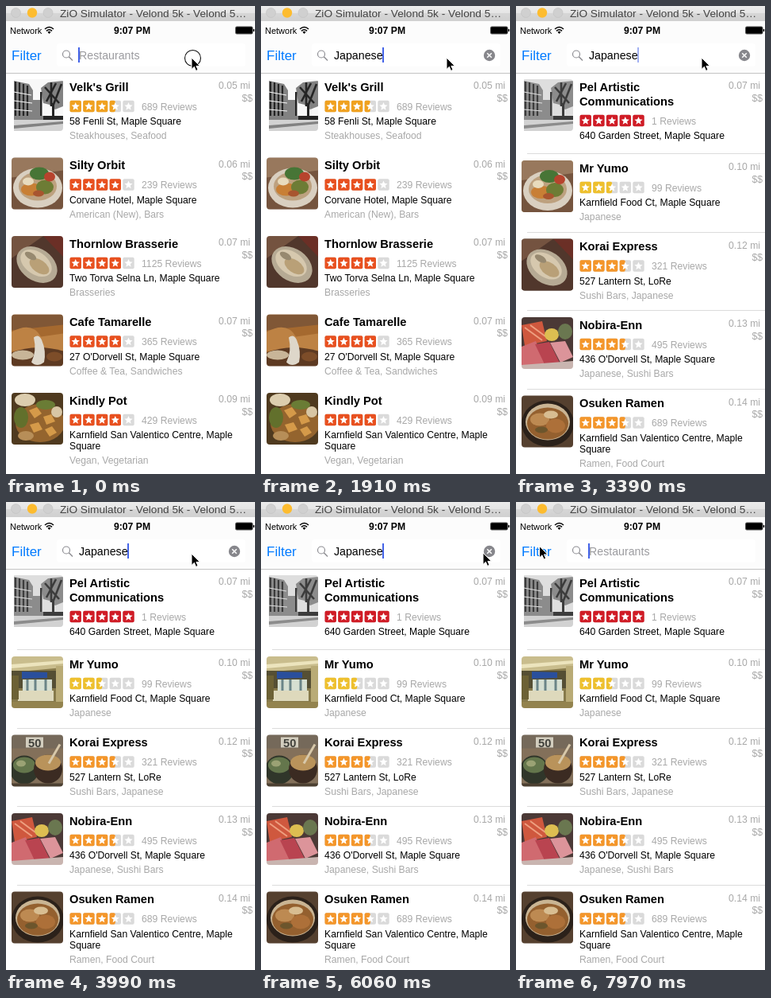
These frames come from a looping animation (314 px wide and 588 px high, 8000 ms). An HTML page:

```html
<!DOCTYPE html>
<html lang="en">
<head>
<meta charset="utf-8">
<title>Restaurant search</title>
<style>
html, body { margin: 0; width: 100%; height: 100%; overflow: hidden; background: #fff; }
svg { display: block; width: 314px; height: 588px; font-family: "Liberation Sans", Arial, sans-serif; }
text { white-space: pre; }
.name { font-size: 14.7px; font-weight: bold; }
.line { font-size: 12.2px; }
.pale { fill: #a8a8a8; }
.field { font-size: 14.2px; }
.end { text-anchor: end; }
</style>
</head>
<body>
<svg id="stage" viewBox="0 0 314 588"></svg>
<script>
const LOOP = 8000, STEP = 147.5, ROW = 98.5;

const rect = (x, y, w, h, fill, extra = '') => `<rect x="${x}" y="${y}" width="${w}" height="${h}" fill="${fill}" ${extra}/>`;
const oval = (x, y, rx, ry, fill, extra = '') => `<ellipse cx="${x}" cy="${y}" rx="${rx}" ry="${ry}" fill="${fill}" ${extra}/>`;
const path = (d, fill, extra = '') => `<path d="${d}" fill="${fill}" ${extra}/>`;
const line = (d, colour, width) => path(d, 'none', `stroke="${colour}" stroke-width="${width}"`);
const text = (x, y, cls, str, extra = '') => `<text x="${x}" y="${y}" class="${cls}" ${extra}>${str}</text>`;
const ground = fill => rect(-4, -4, 73, 73, fill);

// Thumbnails, each in a 65 x 65 box
const street = (sky, dark, mid) => ground(sky) +
  path('M3 2L22 6 27 14V50H3Z', mid) + line('M5 3V48M10 4V48M15 6V48M20 8V48', dark, 2.2) +
  line('M3 16L25 20M3 27L26 30M3 38L26 40', sky, 1.2) + path('M27 26H37V48H27Z', mid) +
  path('M37 11L46 4 65 2V34L55 38 48 32 40 30Z', mid) + line('M42 10L60 30M56 5L44 28M50 4V34M63 6L52 34', dark, 2.6) +
  rect(36, 16, 2.5, 38, dark) + rect(51, 30, 3, 24, dark) + rect(3, 46, 62, 5, mid) + rect(40, 46, 25, 6, dark) +
  rect(3, 51, 62, 14, '#d2d2d2') + path('M3 58L65 53V56L3 62Z', mid) + rect(-4, -4, 7, 73, '#fff');

const photos = {
  streetBold: street('#f8f8f8', '#252525', '#828282'),
  street: street('#dedede', '#3c3c3c', '#8c8c8c'),
  salad: ground('#75543e') + path('M0 0H65V16L0 25Z', '#98785d') + oval(33, 38, 31, 25, '#d9cfc0') +
    oval(33, 36, 24, 18, '#bda17f') + oval(25, 40, 13, 8, '#c87f35') + oval(42, 37, 11, 9, '#6d7c35') +
    oval(35, 20, 12, 8, '#477536') + oval(48, 24, 7, 6, '#b7432d') + oval(21, 30, 7, 5, '#e8dbbd') + oval(34, 45, 7, 4, '#a8552f'),
  shell: ground('#51372c') + path('M0 0H40L0 28Z', '#745340') + path('M40 0H65V26Z', '#6b2f26') +
    oval(32, 36, 28, 20, '#b6aa94', 'transform="rotate(35 32 36)"') + oval(31, 34, 22, 14, '#d6c8ae', 'transform="rotate(35 31 34)"') +
    oval(35, 38, 14, 8, '#b9a077', 'transform="rotate(35 35 38)"') + oval(24, 25, 8, 4, '#978970', 'transform="rotate(30 24 25)"'),
  bread: ground('#a5692f') + path('M0 0H65V13L0 20Z', '#805736') + path('M0 22Q26 8 37 28L65 24V46H0Z', '#bd8244') +
    path('M0 48Q30 36 65 46V69H0Z', '#5d3a22') + path('M28 29Q34 24 38 32Q44 46 41 60Q32 67 25 60Q32 46 28 29Z', '#ded7ca') +
    oval(14, 51, 14, 6, '#c8b598') + oval(54, 53, 10, 6, '#7d4d29'),
  tofu: ground('#4f3a1f') + oval(36, 38, 31, 24, '#94642e') + oval(17, 9, 13, 8, '#dccdae') +
    path('M22 22l10-4 6 8-9 6zM40 30l10-3 5 9-11 4zM23 40l11-3 5 9-11 4zM42 46l9-4 6 8-9 5z', '#d59a49') +
    oval(12, 31, 9, 13, '#62702c') + oval(43, 15, 12, 6, '#6a7c35') + oval(18, 54, 10, 6, '#b78e58') + oval(57, 24, 7, 7, '#d8c6a4'),
  shop: ground('#877a4b') + path('M0 0H65V14L0 20Z', '#c9bd8d') + path('M0 10L65 5V9L0 15Z', '#ece4bd') + rect(0, 18, 65, 22, '#554f34') +
    path('M13 19L45 20V27L13 28Z', '#2a4f9c') + rect(14, 29, 37, 14, '#d6dfd2') + line('M20 29V43M30 29V43M43 29V43', '#6b8588', 3) +
    path('M8 43H53V56H8Z', '#ded9bc') + rect(0, 24, 9, 30, '#6c6135') + rect(56, 12, 13, 46, '#b9ab76') + rect(-4, 57, 73, 12, '#93834e'),
  soup: ground('#83705a') + rect(-4, -4, 73, 21, '#75695a') + rect(18, 3, 22, 13, '#d2cdbe') +
    text(21, 15, 'name', '50', 'fill="#42423c"') + oval(16, 44, 18, 18, '#30362a') + oval(16, 38, 14, 10, '#64764c') +
    oval(12, 36, 6, 4, '#9ba274') + oval(46, 43, 18, 18, '#3b2b22') + oval(46, 35, 16, 10, '#b9935b') + line('M47 36L61 12', '#d7c8aa', 3) +
    path('M0 61H65V69H0Z', '#4c4032'),
  sashimi: ground('#4b3936') + path('M0 10L26 5 32 30 4 36Z', '#cf583e') +
    line('M4 13L26 29M11 10L30 24', '#ee9f80', 2) + oval(38, 22, 9, 8, '#ddbe51') +
    oval(55, 18, 9, 10, '#6a7750') + path('M0 37L18 30 30 61H0Z', '#d06a70') + path('M17 34L35 31 48 57 30 61Z', '#b94450') +
    path('M36 32L55 30 65 50 49 57Z', '#dc949a') + path('M0 60L65 55V69H0Z', '#c9b5b0'),
  ramen: ground('#55402f') + oval(33, 35, 33, 29, '#2b211a') + oval(33, 33, 28, 23, '#c9b493') +
    oval(33, 35, 26, 20, '#94602f') + oval(23, 30, 12, 8, '#bd8a52') + oval(43, 38, 12, 9, '#ad7039') +
    oval(37, 24, 9, 5, '#d8bd91') + oval(25, 43, 8, 4, '#6c552c')
};

// photo, name, rating, star colour, reviews, address, categories, distance
const nearby = [
  ['streetBold', "Velk's Grill", 3.5, '#f0a11f', 689, '58 Fenli St, Maple Square', 'Steakhouses, Seafood', '0.05'],
  ['salad', 'Silty Orbit', 4, '#e8501f', 239, 'Corvane Hotel, Maple Square', 'American (New), Bars', '0.06'],
  ['shell', 'Thornlow Brasserie', 4, '#e8501f', 1125, 'Two Torva Selna Ln, Maple Square', 'Brasseries', '0.07'],
  ['bread', 'Cafe Tamarelle', 4, '#e8501f', 365, "27 O'Dorvell St, Maple Square", 'Coffee &amp; Tea, Sandwiches', '0.07'],
  ['tofu', 'Kindly Pot', 4, '#e8501f', 429, 'Karnfield San Valentico Centre, Maple|Square', 'Vegan, Vegetarian', '0.09']
];
const japanese = [
  ['street', 'Pel Artistic|Communications', 5, '#d01c26', 1, '640 Garden Street, Maple Square', '', '0.07'],
  ['shop', 'Mr Yumo', 2.5, '#eec02d', 99, 'Karnfield Food Ct, Maple Square', 'Japanese', '0.10'],
  ['soup', 'Korai Express', 3.5, '#f4962a', 321, '527 Lantern St, LoRe', 'Sushi Bars, Japanese', '0.12'],
  ['sashimi', 'Nobira-Enn', 3.5, '#f4962a', 495, "436 O'Dorvell St, Maple Square", 'Japanese, Sushi Bars', '0.13'],
  ['ramen', 'Osuken Ramen', 3.5, '#f4962a', 689, 'Karnfield San Valentico Centre, Maple|Square', 'Ramen, Food Court', '0.14']
];

const starShape = Array.from({ length: 10 }, (_, i) => {
  const r = i % 2 ? 2.4 : 5.4, a = i * Math.PI / 5;
  return `${(7.2 + r * Math.sin(a)).toFixed(2)},${(7.5 - r * Math.cos(a)).toFixed(2)}`;
}).join(' ');

const stars = (y, rating, colour) => [0, 1, 2, 3, 4].map(i => {
  const filled = Math.max(0, Math.min(1, rating - i)) * 14.4;
  return `<g transform="translate(${80.5 + i * 16.7} ${y})">` + rect(0, 0, 14.4, 14.4, '#dadada', 'rx="2"') +
    (filled ? rect(0, 0, filled, 14.4, colour, 'rx="2"') : '') + `<polygon points="${starShape}" fill="#fff"/></g>`;
}).join('');

const photo = (key, y) =>
  `<g transform="translate(7 ${y})" clip-path="url(#thumb)"><g filter="url(#soft)">${photos[key]}</g></g>`;

function row([pic, name, rating, colour, reviews, address, kinds, miles], y) {
  const names = name.split('|'), lines = address.split('|');
  const top = y + (names.length - 1) * 18;
  return photo(pic, y + 7) +
    names.map((s, i) => text(80, y + 21.5 + i * 18, 'name', s)).join('') +
    stars(top + 33.8, rating, colour) +
    text(171, top + 45.5, 'line pale', `${reviews} Reviews`) +
    lines.map((s, i) => text(80, top + 64 + i * 14, 'line', s)).join('') +
    text(80, top + 82 + (lines.length - 1) * 14, 'line pale', kinds) +
    text(308, y + 19, 'line pale end', `${miles} mi`) + text(311, y + 34.5, 'line pale end', '$$');
}

const resultTop = i => 85 + ROW * i + (i ? 3.5 : 0);

document.getElementById('stage').innerHTML = `
<defs>
  <clipPath id="thumb"><rect width="65" height="65" rx="4"/></clipPath>
  <filter id="soft"><feGaussianBlur stdDeviation=".7"/></filter>
  <linearGradient id="bar" x2="0" y2="1">
    <stop stop-color="#ececec"/><stop offset=".5" stop-color="#e4e4e4"/><stop offset=".5" stop-color="#d6d6d6"/><stop offset="1" stop-color="#d0d0d0"/>
  </linearGradient>
</defs>
${rect(0, 0, 314, 588, '#fff')}
<g id="nearby">${nearby.map((r, i) => row(r, 85 + ROW * i)).join('')}</g>
<g id="results">
  ${japanese.map((r, i) => row(r, resultTop(i)) + (i ? rect(14, Math.round(resultTop(i) - 1.6), 300, 1, '#dcdcdc') : '')).join('')}
  <g id="stale">${photo('salad', resultTop(1) + 7)}${photo('shell', resultTop(2) + 7)}</g>
</g>
${rect(0, 19, 314, 65, '#fcfcfc')}${rect(0, 84, 314, 1, '#c4c4c4')}
${rect(0, 0, 314, 19, 'url(#bar)')}
${oval(12.5, 8.5, 6, 6, '#d0d0d0', 'stroke="#c0c0c0" stroke-width=".6"')}
${oval(33, 8.5, 6.2, 6.2, '#fdbc2f')}
${oval(53, 8.5, 6, 6, '#d0d0d0', 'stroke="#c0c0c0" stroke-width=".6"')}
${text(68, 14, '', 'ZiO Simulator - Velond 5k - Velond 5…', 'font-size="13.7" fill="#444"')}
${text(5, 34.5, '', 'Network', 'font-size="11"')}
${line('M49 29Q54.500 24 60 29M51 31.300Q54.500 28.200 58 31.300', '#000', 1.6)}
${path('M52.500 32.700Q54.500 31 56.500 32.700L54.500 35Z', '#000')}
${text(159, 34.5, '', '9:07 PM', 'font-size="12.2" font-weight="bold" text-anchor="middle"')}
${rect(289.5, 26, 21.5, 9, '#000', 'rx="1.5" stroke="#555"')}${rect(311.7, 29, 1.5, 3, '#000')}
${rect(64, 47, 238, 29, '#fff', 'rx="4"')}
${text(7, 68, '', 'Filter', 'font-size="17" fill="#007aff"')}
${oval(76, 60.5, 4.5, 4.5, 'none', 'stroke="#8e8e93" stroke-width="1.2"')}
${line('M79.300 63.800L84 68.500', '#8e8e93', 1.5)}
${text(92, 66.5, 'field', 'Restaurants', 'id="hint" fill="#9b9b9f"')}
${text(92, 66.5, 'field', '', 'id="query"')}
<g id="clear">${oval(288, 62, 7.2, 7.2, '#87878c')}${line('M285.200 59.200l5.600 5.600m0-5.600l-5.600 5.600', '#fff', 1.5)}</g>
${rect(0, 52, 2, 19, '#4262e8', 'id="caret"')}
<g id="pointer">
  ${oval(1.5, 0.5, 10, 10, 'none', 'id="ring" stroke="#111" stroke-width="1.1"')}
  ${path('M0 0V14.500L3.400 11.300 5.600 16.400 8.100 15.300 5.900 10.400H10.500Z', '#000', 'stroke="#fff" stroke-width="1"')}
</g>`;

const $ = id => document.getElementById(id);
const show = (id, opacity) => $(id).setAttribute('opacity', opacity);

// Pointer stops: step, x, y
const route = [
  [0, 234, 65], [29, 234, 65], [34, 204.5, 97.5], [37, 206, 116], [41, 280, 64], [42, 289, 64], [47, 289, 64],
  [48, 272, 46], [49, 228, 24], [51, 120, 14], [53, 44, 40], [54, 29.5, 55.5]
];

function pointerAt(step) {
  const next = Math.max(1, route.findIndex(([s]) => s >= step));
  const [a, b] = [route[next - 1], route[next]];
  const f = (step - a[0]) / (b[0] - a[0]);
  return [a[1] + (b[1] - a[1]) * f, a[2] + (b[2] - a[2]) * f];
}

function typedLetters(step) {
  if (step < 5 || step >= 43) return 0;
  if (step < 8) return 1;
  return step < 13 ? step - 6 : 8;
}

function caretOpacity(step) {
  if (step < 5) return [1, 0.5, 0.2, 0, 0][step];
  const lastReset = step < 30 ? 13 : step < 43 ? 14 : 45;
  const since = step - lastReset - 4;
  return since < 0 ? 1 : [0.5, 0, 0, 0.5, 1, 1][since % 6];
}

function draw() {
  const step = Math.min(54, Math.floor((performance.now() % LOOP + 8) / STEP));
  const letters = typedLetters(step);
  $('query').textContent = 'Japanese'.slice(0, letters);
  show('hint', letters ? 0 : 1);
  show('clear', letters ? (step === 5 ? 0.5 : 1) : 0);
  $('caret').setAttribute('x', 91 + (letters ? $('query').getComputedTextLength() + 0.5 : 0));
  show('caret', caretOpacity(step));

  show('nearby', step < 23 ? 1 : 0);
  show('results', step < 23 ? 0 : 1);
  show('stale', Math.max(0, Math.min(1, (25 - step) / 2)));

  $('pointer').setAttribute('transform', `translate(${pointerAt(step)})`);
  show('ring', { 0: 1, 1: 0.5, 42: 1, 43: 0.6 }[step] || 0);
  requestAnimationFrame(draw);
}
draw();
</script>
</body>
</html>
```
